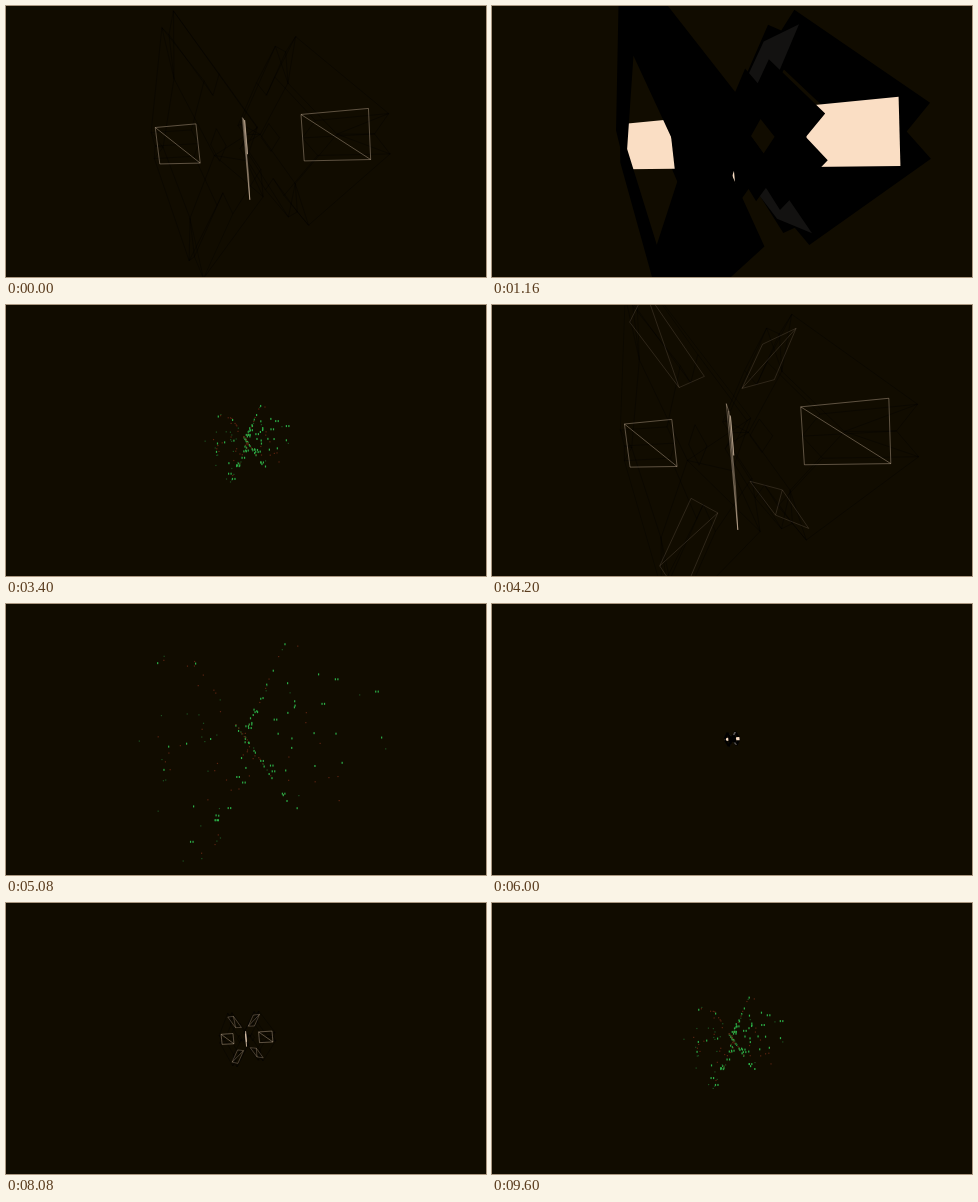
An HTML page with a canvas for the animation above (9640 ms loop, 480 by 271 pixels).

```html
<!DOCTYPE html>
<html>
<head>
<meta charset="utf-8">
<style>
html, body { margin: 0; height: 100%; overflow: hidden; background: #110c00; }
canvas { display: block; width: 100%; height: 100%; }
</style>
</head>
<body>
<canvas id="stage" width="480" height="271"></canvas>
<script>
const ctx = document.getElementById('stage').getContext('2d');
const LOOP = 9640, PEAK = 150, DEPTH = 222;
const PEACH = '250,222,196';

// Object axes as seen by the camera: right, down, towards the viewer
const AXES = [[-.82, .12, .565], [.475, .73, .515], [.346, -.7, .635]];

// Pulse phase: [time, pulses so far]; each pulse grows from the centre and shrinks back
const BEATS = [[0, .246], [1160, 2.648], [2480, 5.268], [4200, 8.675],
  [6000, 12.016], [8080, 16.055], [9600, 19.108], [LOOP, 19.19]];
// Look of each pulse: wire, fill or points
const LOOKS = 'wpfwpfwpwfpffwfpwfwp';

const hash = n => {
  const v = Math.sin(n * 127.1 + 31.7) * 43758.5453;
  return v - Math.floor(v);
};

let size = 0;
function project(p) {
  const [x, y, z] = [0, 1, 2].map(i => AXES.reduce((sum, axis, k) => sum + axis[i] * p[k], 0));
  const zoom = size / (1 - size * z / DEPTH);
  return [240 + x * zoom, 135 + y * zoom];
}

// Repeats the points of one corner around the first axis
function ring(x, corner) {
  const out = [];
  for (let k = 0; k < 4; k++) {
    out.push(...corner.map(([y, z]) => [x, y, z]));
    corner = corner.map(([y, z]) => [-z, y]);
  }
  return out;
}

// A square with a notch in every corner
const notched = (x, tip, spread, notch) =>
  ring(x, [[tip + spread, tip - spread], [notch, notch], [tip - spread, tip + spread]]);

// An upright rectangle along the diagonal of the cube
function panel(sx, sy, sz) {
  const at = (along, side) =>
    [sx * along, sy * along + sz * side, sz * along - sy * side];
  const inner = .302, outer = .6, half = .142;
  return {
    bright: sy === sz,
    points: [at(inner, -half), at(outer, -half), at(outer, half), at(inner, half)]
  };
}

const halves = [-1, 1].map(side => ({
  frame: notched(side * .62, .695, .106, .62),
  opening: ring(side * .62, [[.39, .39]]),
  block: notched(side * .3, .405, .1, .3),
  bore: ring(side * .3, [[.1, .1]]),
  panels: [[1, 1], [-1, 1], [1, -1], [-1, -1]].map(s => panel(side, ...s))
}));
const [back, front] = halves;

function trace(points) {
  points.map(project).forEach((p, i) => i ? ctx.lineTo(...p) : ctx.moveTo(...p));
  ctx.closePath();
}

function fill(color, ...outlines) {
  ctx.beginPath();
  outlines.forEach(trace);
  ctx.fillStyle = color;
  ctx.fill('evenodd');
}

function segment(a, b) {
  ctx.moveTo(...project(a));
  ctx.lineTo(...project(b));
}

function drawFill(t) {
  const g = 2 + t * .0145;
  const frame = h => fill('#000', h.frame, h.opening);
  const block = h => fill('#000', h.block, h.bore);
  const panels = h => h.panels.forEach(p =>
    fill(p.bright ? `rgb(${PEACH})` : `rgb(${g},${g * .95},${g * .92})`, p.points));
  frame(back);
  panels(back);
  block(back);
  block(front);
  panels(front);
  frame(front);
}

function drawWire(t) {
  ctx.lineWidth = .8;
  ctx.strokeStyle = 'rgba(0,0,0,.4)';
  for (const { frame, opening, block, bore } of halves) {
    ctx.beginPath();
    [frame, opening, block, bore].forEach(trace);
    frame.forEach((p, i) => {
      segment(p, block[i]);
      segment(p, opening[Math.floor(i / 3)]);
    });
    ctx.stroke();
  }
  for (const { bright, points } of halves.flatMap(h => h.panels)) {
    ctx.strokeStyle = `rgba(${PEACH},${bright ? .42 : t / 26000})`;
    ctx.beginPath();
    trace(points);
    segment(points[0], points[2]);
    ctx.stroke();
  }
}

function drawDots() {
  for (let i = 0; i < 170; i++) {
    const side = i % 2 ? 1 : -1;
    const reach = .15 + .5 * hash(i);
    const along = (hash(i + 200) * 2 - 1) * reach * 1.15;
    const edge = ring(side * reach, [[reach * 1.1, along]]);
    const [x, y] = project(edge[Math.floor(hash(i + 400) * 4)]);
    const green = hash(i + 600) < (side < 0 ? .55 : .25);
    ctx.fillStyle = green ? '#2cb047' : hash(i + 800) < .4 ? '#1c5220' : '#5c2410';
    ctx.fillRect(x, y, 1.2, green ? 2 : 1.2);
    if (green && hash(i + 900) < .3) ctx.fillRect(x + 2.5, y, 1.2, 2);
  }
}

function phaseAt(t) {
  const i = BEATS.findIndex(b => b[0] > t);
  const [t0, p0] = BEATS[i - 1], [t1, p1] = BEATS[i];
  return p0 + (p1 - p0) * (t - t0) / (t1 - t0);
}

function draw(t) {
  const phase = phaseAt(t);
  size = PEAK * Math.abs(Math.sin(Math.PI * phase));
  ctx.fillStyle = '#110c00';
  ctx.fillRect(0, 0, 480, 271);
  ({ f: drawFill, w: drawWire, p: drawDots })[LOOKS[Math.floor(phase)]](t);
}

const start = performance.now();
function tick() {
  const t = (performance.now() - start) % LOOP;
  draw(Math.floor(t / 40) * 40);
  requestAnimationFrame(tick);
}
tick();
</script>
</body>
</html>
```
